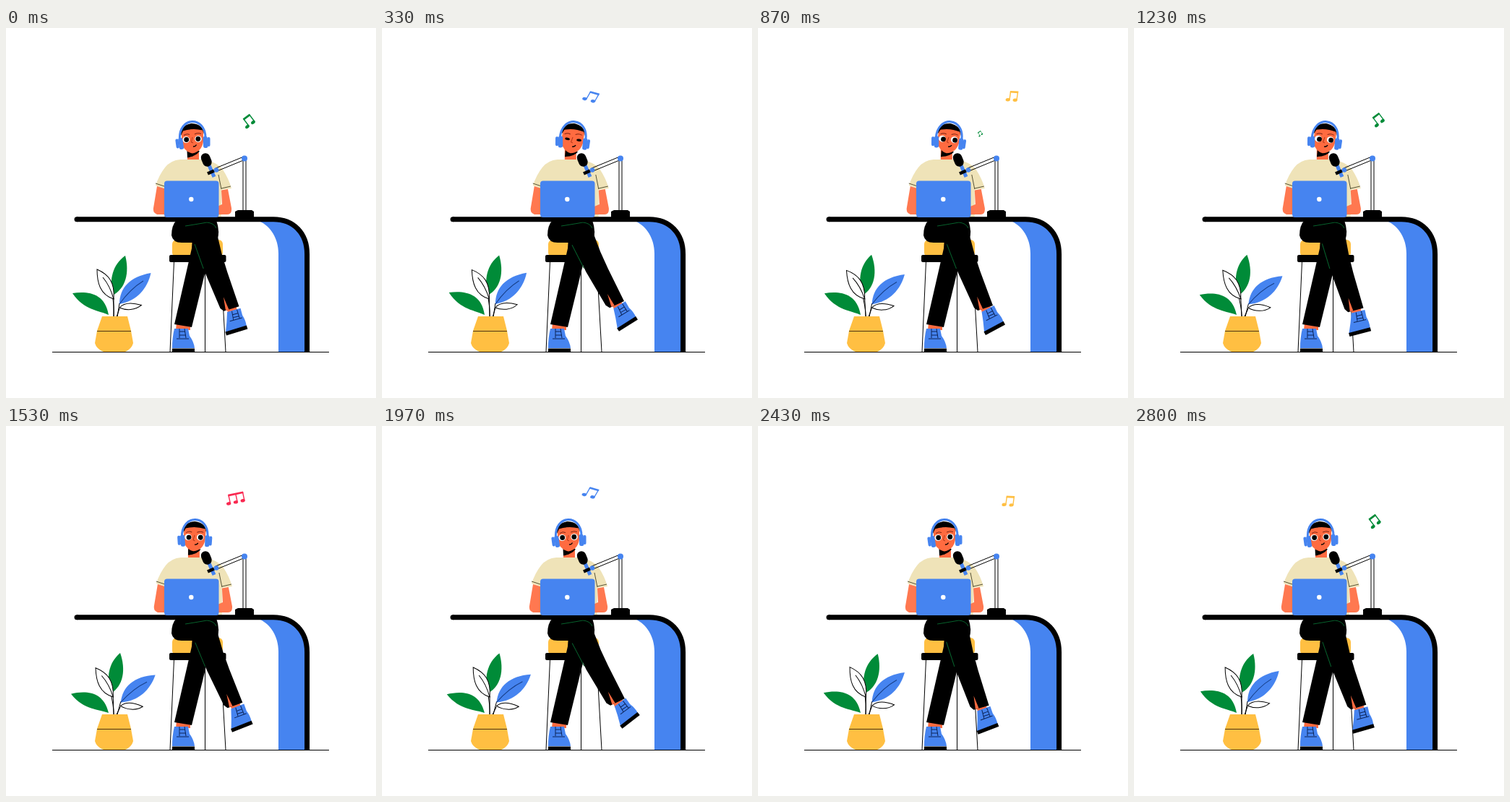
These frames come from a looping animation (512 px wide and 512 px high, 2.83 s). An HTML page:

```html
<!DOCTYPE html>
<html lang="en">
<head>
<meta charset="utf-8">
<title>Podcast desk</title>
<style>
  html, body { margin: 0; width: 100%; height: 100%; overflow: hidden; background: #fff; }
  svg { display: block; width: 100vw; height: 100vh; }
  .blue { fill: #4684f0; }
  .gold { fill: #ffbf42; }
  .green { fill: #008b38; }
  .skin { fill: #ff6b40; }
  .arm { fill: #ff7850; }
  .shirt { fill: #efe3b8; }
  .white { fill: #fff; }
  .line { fill: none; stroke: #000; stroke-width: 1; }
  .lace { fill: none; stroke: #0c2458; stroke-width: 1; }
  .outline { fill: #fff; stroke: #000; stroke-width: 1; }
  .seam { fill: none; stroke: #07612c; stroke-width: 1; }
</style>
</head>
<body>
<svg viewBox="0 0 512 512">
  <path class="line" d="M64 448.500H447"/>

  <!-- stool -->
  <path class="line" d="M232.500 323L227 448M275.500 323V448M297 323L304 448"/>
  <rect class="gold" x="230" y="293" width="70" height="24" rx="6"/>
  <rect x="226" y="314" width="78.500" height="10" rx="2"/>

  <!-- standing leg -->
  <path class="skin" d="M236 408H255V418H235Z"/>
  <path class="blue" d="M233 416H252L254 426Q260 434 261 443H230Q230 428 233 416Z"/>
  <path class="lace" d="M240 416V429M247 416L249 429M240 420H248M240 425H249M236 430H253"/>
  <path d="M230 443.500H261V449H230Z"/>
  <path d="M258 290L257 305L233 410L257 414L279 324L290 316L293 290Z"/>

  <!-- crossed leg -->
  <path d="M236 266H291Q296 280 293 291L288 297H243Q231 297 229 287Q229 273 236 266Z"/>
  <g id="leg">
    <path class="skin" d="M301 374L318 380L319 393L307 396Z"/>
    <g id="foot">
      <path class="blue" d="M305.500 393L324 388L326.500 398Q331 405 332 413L303 421Q305 406 305.500 393Z"/>
      <path class="lace" d="M312 392L314 404M319 390L322.500 402M313 397L320 395M313 401L322 399M309 406L326 401.500"/>
      <path d="M302.500 420.500L332 412L333.500 417L304 425.500Z"/>
    </g>
    <path d="M260 288L293 289Q298 314 306 338L322 385.500L301 392L296 388L275 338Z"/>
    <path class="skin" d="M300.500 372.500L308 389.800L303.500 391.200Z"/>
    <path class="seam" d="M261 299L273 333"/>
  </g>
  <path class="seam" d="M248 274Q267 271 278 269Q288 270 291 277"/>

  <!-- desk -->
  <path class="blue" d="M350 267H372C398 267 414 290 414 312V448H377V312C377 291 366 274 350 267Z"/>
  <path d="M98 264.800H370C398 264.800 416.600 284 416.600 313V448" fill="none" stroke="#000" stroke-width="7"/>
  <circle cx="98" cy="264.800" r="3.500"/>

  <!-- person -->
  <g id="body">
    <path class="shirt" d="M241 182H272Q292 185 300 196Q308 208 312 222L298 224V261H219V222L207 218Q212 203 220 193Q228 183 241 182Z"/>
    <path class="arm" d="M209 219L219 222V258H209Q203 256 204 249ZM298 224.500L307 223L312 249Q313 258 306 258H292V247L299 244Z"/>
    <path class="line" d="M207 215L219 219M298 222L311 219M294 203L298 223" style="stroke:#575337"/>
    <path class="skin" d="M251 166H267V182H251Z"/>
    <g id="head">
      <path d="M250.500 170H268Q264 177 251 179.500Z"/>
      <path class="skin" d="M243 143Q257 134 273 142V157Q271 171 258 173.500Q245 171 243 157Z"/>
      <path d="M242 149Q241 134 257 132Q273 133 274 147L272 141.500Q258 138 245 142.500Z"/>
      <path d="M240.500 155C238 122 276 121 276 152" fill="none" stroke="#4684f0" stroke-width="3"/>
      <g class="blue">
        <rect x="235" y="153.500" width="4.300" height="13" rx="2" transform="rotate(-8 237 160)"/>
        <rect x="239" y="152" width="6.300" height="16" rx="2.500" transform="rotate(-8 242 160)"/>
        <rect x="272.800" y="150" width="6.300" height="16" rx="2.500" transform="rotate(-3 276 158)"/>
        <rect x="278.500" y="151" width="4" height="13" rx="2"/>
      </g>
      <g id="eyes">
        <g id="whites" class="white">
          <ellipse cx="249.300" cy="154.500" rx="4.800" ry="4.500"/>
          <ellipse cx="266" cy="153.500" rx="4.800" ry="4.500"/>
        </g>
        <g id="pupils"><circle cx="249.700" cy="154.500" r="3.400"/><circle cx="265.800" cy="153.500" r="3.400"/></g>
      </g>
      <path class="line" d="M246 148.500Q250 145.500 254 147.500M261 147Q266 144.500 270 146.500" style="stroke:#7c2412"/>
      <path class="line" d="M258 151L256.500 158L259 159" style="stroke:#b53a1c"/>
      <path class="line" d="M259 164Q262 164.500 263.500 161.500" style="stroke-width:1.400"/>
    </g>
  </g>

  <!-- laptop -->
  <rect class="blue" x="219" y="211.500" width="75.500" height="50.500" rx="4"/>
  <circle class="white" cx="256.300" cy="237" r="3.200"/>

  <!-- microphone -->
  <path class="line" d="M290 194L329 178M292 198L331 182M328 182V254M332 182V254"/>
  <circle class="blue" cx="330" cy="180.500" r="4"/>
  <path d="M281 190L288 206" stroke="#4684f0" stroke-width="5"/>
  <path d="M276 179.500L278.500 185.500" stroke="#000" stroke-width="12.500" stroke-linecap="round"/>
  <path d="M279 201.500L288 197.500" stroke="#000" stroke-width="4.500"/>
  <circle class="blue" cx="291" cy="196.500" r="3.300"/>
  <path d="M321 252H340L343 254V262H317V254Z"/>

  <!-- plant -->
  <g id="upLeaf">
    <path class="line" d="M149 400Q150 385 147 369"/>
    <path class="green" d="M147 370C143 348 147 328 165 315C171 338 166 361 147 370Z"/>
  </g>
  <g id="paleLeaf">
    <path class="line" d="M149 400V374"/>
    <path class="outline" d="M149 375C130 369 126 352 126 334C142 341 151 352 149 375Z"/>
    <path class="line" d="M149 375Q144 357 134 345"/>
  </g>
  <g id="lowLeaf"><path class="green" d="M142 397C130 391 108 391 92 367C112 364 137 366 142 397Z"/></g>
  <g id="smallLeaf">
    <path class="line" d="M153 400L157 388"/>
    <path class="outline" d="M157 387C164 379 176 380 187.500 383.500C179 391 166 391 157 387Z"/>
  </g>
  <g id="blueLeaf">
    <path class="line" d="M154 400L157 381"/>
    <path class="blue" d="M157 382C157 360 171 344 200.500 339C196 360 181 378 157 382Z"/>
    <path class="line" d="M157 382Q172 361 190 350" style="stroke:#173f88"/>
  </g>
  <path class="gold" d="M133 399H168L173 419L176 436Q174 444 165 448H135Q125 444 123 436L126 419Z"/>
  <path class="line" d="M126 419.500H173" style="stroke:#4a3510"/>

  <g id="notes"></g>
</svg>
<script>
const LOOP = 2830, TAU = Math.PI * 2, LIFE = 600;
const el = id => document.getElementById(id);
const set = (id, value) => el(id).setAttribute('transform', value);
const clamp = v => Math.max(0, Math.min(1, v));
const smooth = (a, b, t) => { const u = clamp((t - a) / (b - a)); return u * u * (3 - 2 * u); };
const wave = (t, peak, period = LOOP) => Math.cos(TAU * (t - peak) / period);

// id, pivot, time of furthest clockwise lean, degrees
const leaves = [
  ['upLeaf', '149 398', 2550, 3.3],
  ['paleLeaf', '149 398', 2380, 2.1],
  ['lowLeaf', '142 397', 420, 3],
  ['smallLeaf', '155 398', 1750, 5],
  ['blueLeaf', '154 398', 1650, 3.4]
];

// Notes follow a curve from a shared start: bend point, end point, tilt, slant, stems
const start = [306, 146];
const kinds = {
  green: { color: '#008b38', bend: [321, 149], end: [366, 95], tilt: -37, slant: 0, stems: 2 },
  blue: { color: '#4684f0', bend: [281, 80], end: [290, 68], tilt: 16, slant: -14, stems: 2 },
  gold: { color: '#ffbf42', bend: [345, 125], end: [366, 60], tilt: 3, slant: -5, stems: 2 },
  red: { color: '#f92850', bend: [321, 83], end: [325, 76], tilt: -12, slant: 0, stems: 3 }
};
const order = ['green', 'blue', 'gold', 'green', 'red', 'blue', 'gold'];

function noteShape({ color, stems, slant }) {
  const gap = slant < -10 ? 12 : 10;
  const left = 1.5 - (stems - 1) * gap / 2, right = left + (stems - 1) * gap;
  let lines = '', heads = '';
  for (let x = left; x <= right; x += gap) {
    lines += `M${x} -6V5`;
    heads += `<ellipse cx="${x - 2.2}" cy="5.500" rx="3.200" ry="2.200"/>`;
  }
  return `<g fill="${color}" transform="skewX(${slant})"><path d="${lines}" stroke="${color}" stroke-width="1.400"/>` +
    `<path d="M${left - .7} -7H${right + .7}V-4.300H${left - .7}Z"/>${heads}</g>`;
}

el('notes').innerHTML = order.map((k, i) => `<g id="note${i}">${noteShape(kinds[k])}</g>`).join('');

function moveNote(kind, i, t) {
  const { bend, end, tilt } = kinds[kind];
  const born = 2467 + i * LOOP / order.length;
  const u = ((t - born) % LOOP + LOOP) % LOOP / LIFE;
  if (u >= 1) return set('note' + i, 'scale(0)');
  const at = k => (1 - u) ** 2 * start[k] + 2 * u * (1 - u) * bend[k] + u * u * end[k];
  const size = Math.min(1, .35 + 2 * u, (1 - u) * 6);
  set('note' + i, `translate(${at(0)} ${at(1)}) rotate(${tilt}) scale(${size})`);
}

function draw(now) {
  const t = now % LOOP;

  for (const [id, pivot, peak, amp] of leaves)
    set(id, `rotate(${amp * (wave(t, peak) - wave(0, peak))} ${pivot})`);

  // the crossed leg swings twice per loop, the foot trails behind
  const half = LOOP / 2;
  set('leg', `rotate(${-3 - 5.7 * wave(t, .33 * half, half)} 272 285)`);
  set('foot', `rotate(${-7 + 6.8 * wave(t, .95 * half, half)} 311 389)`);

  const lean = smooth(0, 320, t) - smooth(1280, 1780, t);
  set('body', `translate(${1.8 * lean} 0)`);
  set('head', `rotate(${8.5 * lean} 260 180)`);
  set('pupils', `translate(${1.2 * lean} ${.4 * lean})`);
  const shut = clamp(1.6 - Math.abs(t - 310) / 80);
  set('eyes', `translate(0 ${154 * .5 * shut}) scale(1 ${1 - .5 * shut})`);
  el('whites').style.opacity = 1 - shut;

  order.forEach((kind, i) => moveNote(kind, i, t));
}

const began = performance.now();
function frame() {
  draw(performance.now() - began);
  requestAnimationFrame(frame);
}
frame();
</script>
</body>
</html>
```
